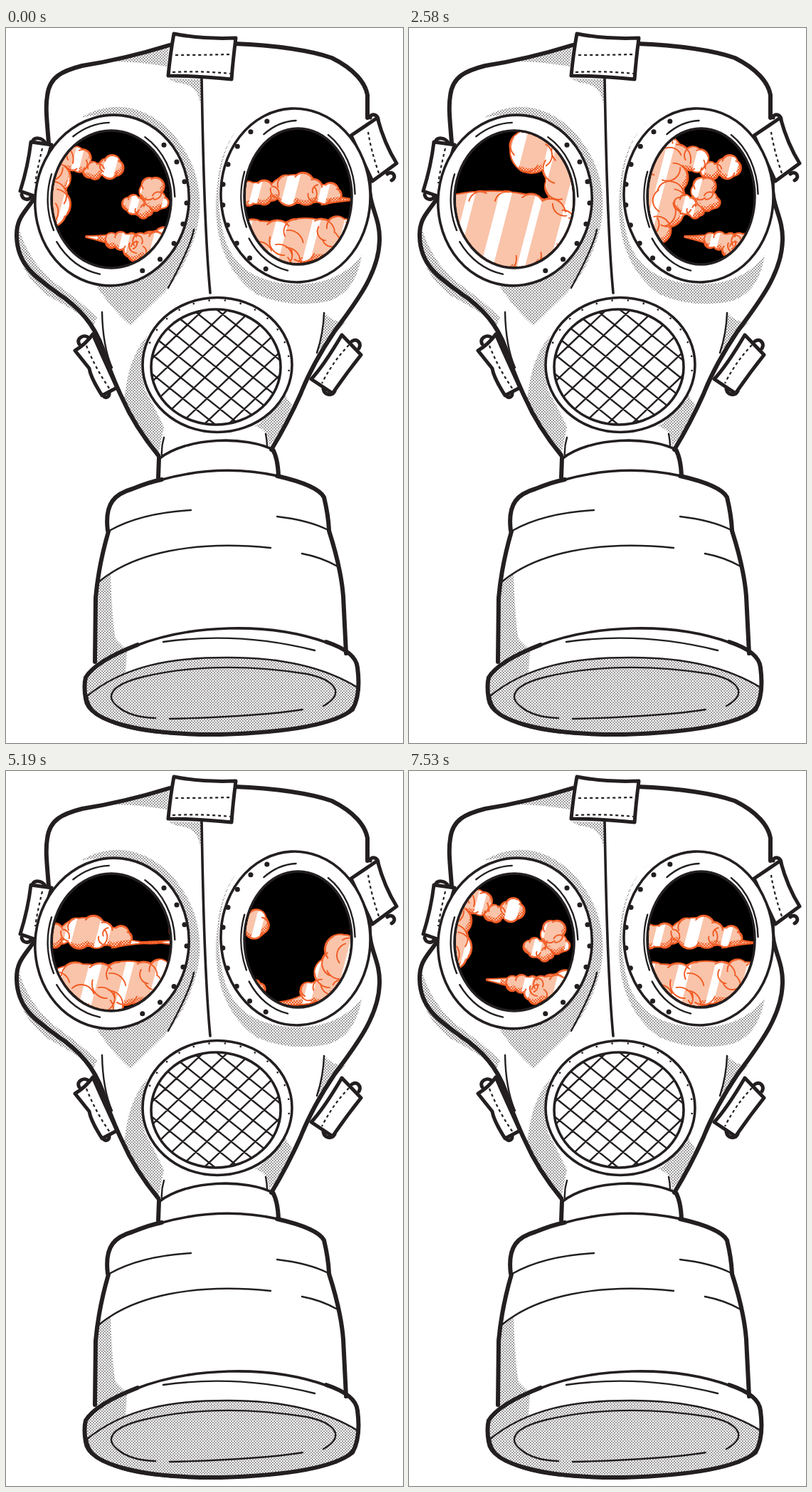
Recreate the animation shown at these times as an HTML page with a canvas. Size 558 by 1004 pixels, loop 7.56 s.

```html
<!DOCTYPE html>
<html lang="en">
<head>
<meta charset="utf-8">
<title>Gas mask</title>
<style>
html, body { margin: 0; width: 100%; height: 100%; overflow: hidden; background: #fff; }
svg, canvas { position: absolute; left: 0; top: 0; width: 558px; height: 1004px; }
.line { fill: none; stroke: #231f20; stroke-width: 2.4; stroke-linecap: round; stroke-linejoin: round; }
.bold { stroke-width: 6; }
.mid { stroke-width: 5; }
.rim { stroke-width: 3.6; }
.white { fill: #fff; }
.black { fill: #000; }
.tone { fill: url(#dots); }
.stitch { stroke-dasharray: 4 4; stroke-width: 2.2; stroke-linecap: butt; }
</style>
</head>
<body>
<svg viewBox="0 0 558 1004">
  <defs>
    <pattern id="dots" width="4" height="4" patternUnits="userSpaceOnUse">
      <circle cx="1" cy="1" r=".8" fill="#231f20"/><circle cx="3" cy="3" r=".8" fill="#231f20"/>
    </pattern>
    <clipPath id="grille"><ellipse cx="295" cy="476" rx="91" ry="81"/></clipPath>
  </defs>

  <!-- straps -->
  <g class="line">
    <path class="white mid" d="M37 160C39 153 50 153 55 161M22 234C23 241 32 243 35 237M512 126C512 119 524 121 523 130M536 205C544 199 550 210 542 214"/>
    <path class="white mid" d="M64 164L35 160Q31 194 20 229L43 237Z"/>
    <path class="white mid" d="M485 151L522 126Q532 163 549 190L515 215Z"/>
    <path class="white mid" d="M103 444C98 436 109 430 115 434M136 514C137 521 146 520 145 512M486 440C494 435 500 443 496 450M446 507C448 516 458 517 462 510"/>
    <path class="white mid" d="M97 453Q112 444 122 430Q136 462 156 505L135 516Q119 491 117 478Z"/>
    <path class="white mid" d="M429 493Q446 475 472 431L499 459Q479 484 459 513Z"/>
    <path class="stitch" d="M51 169Q44 198 41 218M509 146Q513 172 524 204M113 446Q126 479 146 507M482 445Q459 469 444 499"/>
  </g>

  <!-- halftone -->
  <g class="tone">
    <path d="M140 47L229 26L226 54Q180 46 140 47Z"/>
    <path d="M228 71L276 72L273 106Q269 78 240 77Z"/>
    <path d="M105 126C150 98 198 111 229 143C275 190 281 251 263 300Q250 340 223 371L175 418Q147 394 122 354Q210 354 240 285Q271 207 222 151Q173 111 105 126Z"/>
    <path d="M18 282Q35 335 77 364Q110 388 128 407L123 417Q104 400 59 376Q8 337 18 282Z"/>
    <path d="M337 130C300 160 294 230 302 270C310 330 343 357 407 360C450 360 480 345 500 319Q492 370 455 383Q400 395 352 374C305 340 289 285 297 220Q302 160 337 130Z"/>
    <path d="M447 399Q459 414 477 413L437 456Q447 428 447 399Z"/>
    <path d="M198 432C175 462 170 489 165 529Q184 567 214 599L222 560Q208 531 195 508Q188 470 198 432Z"/>
    <path d="M392 515Q376 543 350 559Q372 565 369 590Q390 560 402 530Z"/>
    <path d="M128 780L147 765Q149 834 154 858L170 874L168 905Q135 918 114 938L112 915L127 894Z"/>
  </g>

  <!-- face -->
  <g class="line">
    <path class="bold" d="M60 162C58 134 55 112 58 95C61 68 80 60 107 53Q165 44 230 24M321 22C379 24 430 32 458 42C490 58 505 77 508 94V126"/>
    <path class="bold" d="M41 237C28 258 14 266 15 293C16 333 42 350 72 372C104 393 124 417 136 450Q147 486 163 519Q181 560 214 600"/>
    <path class="bold" d="M511 216C509 250 526 265 525 298C524 346 490 387 461 427Q430 473 414 514Q396 554 373 592"/>
    <path class="white mid" d="M236 8Q275 16 323 14Q319 45 317 72Q268 67 228 67Q231 35 236 8Z"/>
    <path class="stitch" d="M238 38Q277 38 315 37M234 62Q276 60 315 64"/>
    <path class="rim" d="M275 71Q277 190 280 260T287 372"/>
    <path d="M264 283Q260 306 228 365M135 399Q136 447 149 477M447 400Q446 429 437 456M222 575Q218 588 219 602M365 570Q367 579 367 588"/>
  </g>

  <!-- eyepieces -->
  <g class="line">
    <ellipse class="white rim" cx="149" cy="242" rx="108" ry="120" transform="rotate(7 149 242)"/>
    <ellipse class="white rim" cx="407" cy="235" rx="105" ry="122" transform="rotate(-3 407 235)"/>
    <ellipse class="black rim" cx="148" cy="240.500" rx="84" ry="96.500"/>
    <ellipse class="black rim" cx="410.500" cy="236.500" rx="75.500" ry="95.500"/>
    <path id="glints"/>
    <path id="rivets" stroke-width="7"/>
  </g>

  <!-- mouth grille -->
  <g class="line">
    <ellipse class="white rim" cx="297" cy="473" rx="105" ry="94.500"/>
    <ellipse class="white rim" cx="295" cy="476" rx="91" ry="81"/>
    <path id="mesh" clip-path="url(#grille)"/>
    <path id="studs" stroke-width="2.600"/>
  </g>

  <!-- filter -->
  <g class="line">
    <path class="bold" d="M214 631L215 604M375 592Q382 604 383 629"/>
    <path class="rim" d="M215 605C254 574 338 572 377 593M216 635Q301 611 382 629"/>
    <path class="bold" d="M143 706C138 666 154 654 178 647Q203 637 219 634M381 629Q438 642 447 659Q453 684 454 705"/>
    <path class="bold" d="M144 707Q130 755 126 800L125 890M454 706Q471 759 474 798L478 878"/>
    <path d="M145 706Q189 681 260 677M381 686Q425 691 453 705M130 778C179 737 264 719 372 730M416 738Q443 743 466 756"/>
    <path class="tone" d="M114 938C167 895 233 884 309 884Q424 883 494 926Q498 952 465 971Q410 989 306 992C199 995 119 982 114 938Z"/>
    <path class="bold" d="M112 912Q126 889 185 866M450 862Q492 876 494 898Q499 936 487 957C462 977 402 989 302 992C199 993 116 976 112 942Q109 924 112 912"/>
    <path class="rim" d="M181 868C257 838 368 833 451 863"/>
    <path d="M221 862Q327 847 434 874"/>
    <path d="M446 952C479 934 461 915 423 907Q295 887 193 911C148 922 139 938 156 952Q174 968 210 969M230 970Q353 967 417 957"/>
  </g>
</svg>
<canvas id="sky" width="558" height="1004"></canvas>

<script>
const LOOP = 7560, STEP = 30, SLANT = 0.26;
const ORANGE = '#f15a22', PALE = '#f9c4aa';
const ctx = document.getElementById('sky').getContext('2d');

const lenses = [
  { x: 148, y: 240.5, rx: 82, ry: 94.5 },
  { x: 410.5, y: 236.5, rx: 73.5, ry: 93.5 }
];

function setPath(id, d) {
  document.getElementById(id).setAttribute('d', d);
}

function onEllipse(x, y, rx, ry, degrees) {
  const a = degrees * Math.PI / 180;
  return `${x + rx * Math.cos(a)} ${y + ry * Math.sin(a)}`;
}

function dotsOnEllipse(x, y, rx, ry, from, to, count) {
  let d = '';
  for (let i = 0; i < count; i++) {
    d += `M${onEllipse(x, y, rx, ry, from + (to - from) * i / (count - 1))}h.1`;
  }
  return d;
}

setPath('rivets', dotsOnEllipse(149, 242, 105, 108, -46, 66, 8) + dotsOnEllipse(407, 235, 103, 113, 247, 114, 10));
setPath('studs', dotsOnEllipse(297, 473, 101, 91, 200, 365, 14));

// Curved reflections on both eyepiece rims
let glints = '';
for (const { x, y, rx, ry } of lenses) {
  for (const [from, to, scale] of [[235, 268, 1.14], [-58, -2, 1.09], [155, 200, 1.09], [100, 146, 1.13]]) {
    const a = rx * scale, b = ry * scale;
    glints += `M${onEllipse(x, y, a, b, from)}A${a} ${b} 0 0 1 ${onEllipse(x, y, a, b, to)}`;
  }
}
setPath('glints', glints);

// Crossing bars of the mouth grille
let bars = '';
for (let k = -6; k <= 6; k++) {
  const x = 295 + k * 34;
  bars += `M${x - 125} 376L${x + 125} 576M${x + 105} 376L${x - 105} 576`;
}
setPath('mesh', bars);

// Lobes are x, y, rx, ry and tips are x, y, root x, root y, half width, all placed
// at time `ref`. A cloud drifts by speed * t + gain * t^2 and enters at `start`.
const clouds = [
  { start: -1300, ref: 2580, speed: 0.1437, gain: 1.04e-5,
    lobes: [[290, 210, 100, 97], [115, 285, 125, 58], [30, 262, 28, 34], [10, 310, 45, 18], [172, 172, 32, 34],
      [362, 185, 32, 30], [365, 245, 24, 32], [330, 285, 36, 28], [402, 185, 18, 17], [425, 200, 14, 12], [449, 195, 16, 15]],
    tips: [[-72, 326, 0, 309, 12]] },
  { start: 2800, ref: 6450, speed: 0.1057, gain: 3e-6,
    lobes: [[195, 328, 95, 28], [102, 302, 34, 21], [165, 305, 55, 27], [235, 305, 60, 36], [300, 297, 50, 32], [352, 287, 36, 21], [395, 286, 26, 16]],
    tips: [] },
  { start: 3700, ref: 6450, speed: 0.1234, gain: -6e-6,
    lobes: [[222, 232, 33, 17], [278, 226, 38, 22], [318, 233, 24, 15]],
    tips: [[148, 237, 215, 235, 11], [385, 240, 315, 238, 9]] },
  { start: 3200, ref: 4230, speed: 0.167, gain: 0,
    lobes: [[90, 222, 22, 14], [125, 219, 24, 17], [158, 207, 27, 21], [190, 215, 20, 20]],
    tips: [[55, 240, 115, 233, 5]] },
  { start: 5500, ref: 7560, speed: 0.081, gain: 0,
    lobes: [[179, 247, 15, 13], [205, 226, 17, 17], [212, 244, 17, 13], [194, 257, 12, 10]],
    tips: [] },
  { start: 5700, ref: 7560, speed: 0.1066, gain: 0,
    lobes: [[165, 299, 26, 12], [205, 304, 34, 18], [182, 313, 16, 14]],
    tips: [[113, 293, 165, 299, 10]] },
  { start: 2300, ref: 6450, speed: 0.109, gain: 0,
    lobes: [[478, 306, 24, 13]],
    tips: [[404, 318, 475, 312, 8]] }
];

function seeded(seed) {
  return () => (seed = (seed * 16807) % 2147483647) / 2147483647;
}

// Rings each lobe with round puffs, each with a curl that runs into the cloud
function addLobe(cloud, [x, y, rx, ry], random) {
  const puff = Math.min(19, ry * 0.62);
  const a = rx - puff, b = ry - puff;
  const count = Math.max(4, Math.round(Math.PI * (a + b) / (puff * 1.35)));
  const turn = random() * 2;
  cloud.body.moveTo(x + rx - 3, y);
  cloud.body.ellipse(x, y, rx - 3, ry - 3, 0, 0, 2 * Math.PI);
  for (let i = 0; i < count; i++) {
    const out = turn + i * 2 * Math.PI / count;
    const r = puff * (0.85 + random() * 0.3);
    const px = x + a * Math.cos(out), py = y + b * Math.sin(out);
    const from = out - 1.7 + random() * 0.5;
    cloud.body.moveTo(px + r, py);
    cloud.body.arc(px, py, r, 0, 2 * Math.PI);
    cloud.curls.moveTo(px + r * Math.cos(from), py + r * Math.sin(from));
    cloud.curls.arc(px, py, r, from, from + 1.5 + random() * 0.6);
  }
}

function addTip(cloud, [x, y, rootX, rootY, half]) {
  const side = Math.sign(rootX - x) * half, midX = (x + rootX) / 2;
  cloud.body.moveTo(x, y);
  cloud.body.quadraticCurveTo(midX, y, rootX, rootY - side);
  cloud.body.lineTo(rootX, rootY + side);
  cloud.body.quadraticCurveTo(midX, y + 6, x, y);
}

clouds.forEach((cloud, i) => {
  const random = seeded(97 + i * 131);
  cloud.body = new Path2D();
  cloud.curls = new Path2D();
  cloud.lobes.forEach(lobe => addLobe(cloud, lobe, random));
  cloud.tips.forEach(tip => addTip(cloud, tip));
});

function stipple() {
  const tile = document.createElement('canvas');
  tile.width = tile.height = 4;
  const pen = tile.getContext('2d');
  pen.fillStyle = PALE;
  pen.fillRect(0, 0, 4, 4);
  pen.fillStyle = ORANGE;
  pen.fillRect(0, 0, 2, 2);
  pen.fillRect(2, 2, 2, 2);
  return ctx.createPattern(tile, 'repeat');
}
const shade = stipple();

function offset({ start, ref, speed, gain }, time) {
  const t = ((time - start) % LOOP + LOOP) % LOOP + start - ref;
  return speed * t + gain * t * t;
}

function drawShine(lens) {
  ctx.strokeStyle = '#fff';
  for (let i = -1; i <= 2; i++) {
    const x = lens.x - 14 + i * 48;
    ctx.lineWidth = i % 2 ? 11 : 17;
    ctx.beginPath();
    ctx.moveTo(x + 110 * SLANT, 130);
    ctx.lineTo(x - 110 * SLANT, 350);
    ctx.stroke();
  }
}

function drawCloud(cloud, dx, lens) {
  ctx.save();
  ctx.translate(dx, 0);
  ctx.lineWidth = 4;
  ctx.strokeStyle = ORANGE;
  ctx.stroke(cloud.body);
  ctx.clip(cloud.body);
  ctx.fillStyle = shade;
  ctx.fill(cloud.body);
  ctx.translate(-2, -6);
  ctx.fillStyle = PALE;
  ctx.fill(cloud.body);
  ctx.translate(2 - dx, 6);
  drawShine(lens);
  ctx.translate(dx, 0);
  ctx.lineWidth = 1.9;
  ctx.strokeStyle = ORANGE;
  ctx.stroke(cloud.curls);
  ctx.restore();
}

function frame() {
  const time = Math.floor(performance.now() % LOOP / STEP) * STEP;
  ctx.clearRect(0, 0, 558, 1004);
  ctx.lineCap = 'round';
  for (const lens of lenses) {
    ctx.save();
    ctx.beginPath();
    ctx.ellipse(lens.x, lens.y, lens.rx, lens.ry, 0, 0, 2 * Math.PI);
    ctx.clip();
    for (const cloud of clouds) drawCloud(cloud, offset(cloud, time), lens);
    ctx.restore();
  }
  requestAnimationFrame(frame);
}
frame();
</script>
</body>
</html>
```
